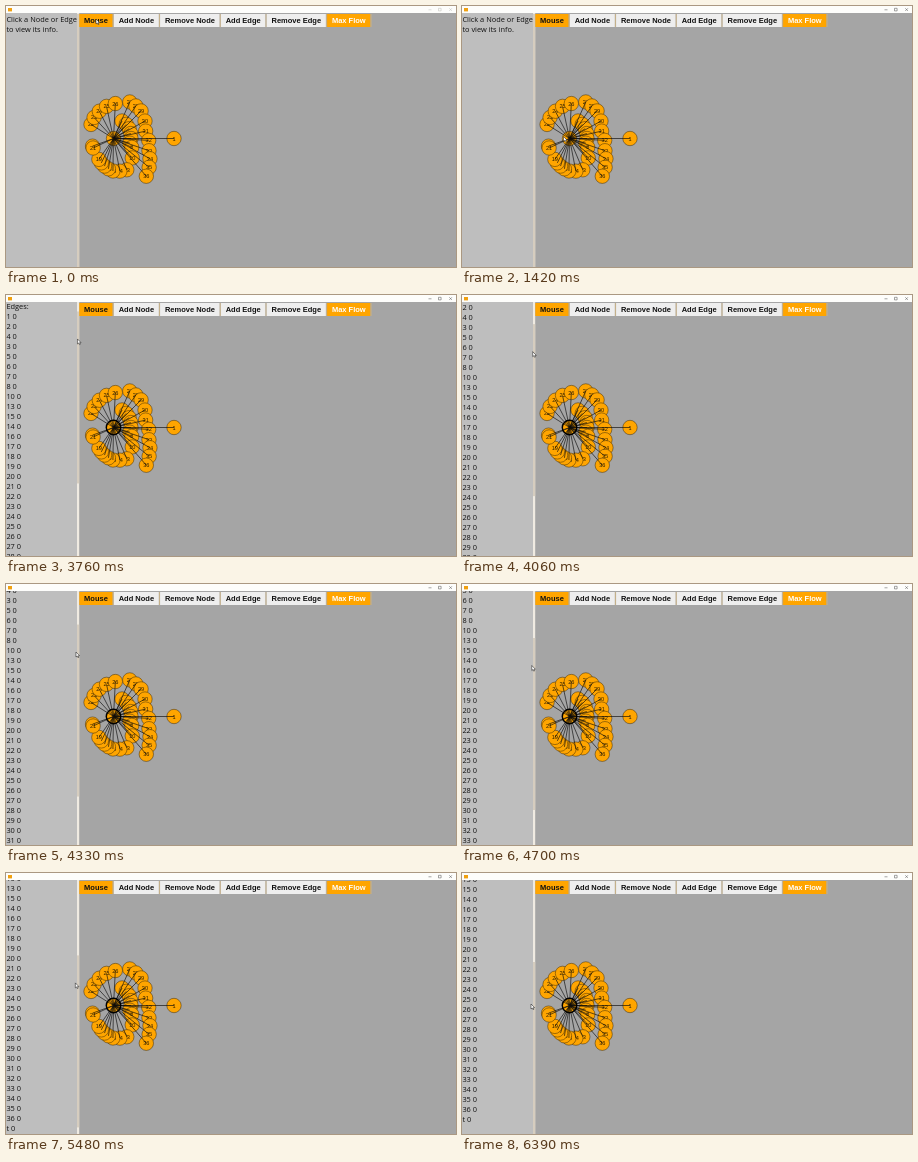
An HTML page for the animation above (6.45 s loop, 450 px wide and 261 px high).

```html
<!DOCTYPE html>
<html lang="en">
<head>
<meta charset="utf-8">
<title>Graph editor</title>
<style>
html, body { margin: 0; height: 100%; overflow: hidden; background: #a5a5a5; }
svg { display: block; width: 450px; height: 261px; }
.side { font: 7.4px "Open Sans", "Noto Sans", sans-serif; fill: #111; white-space: pre; }
.button { font: bold 7.5px "Liberation Sans", Arial, sans-serif; }
.label { font: 5.6px "Liberation Sans", Arial, sans-serif; text-anchor: middle; fill: #2a1c00; }
.node { fill: #ffa500; stroke: #3d2b08; stroke-width: .5; }
</style>
</head>
<body>
<svg viewBox="0 0 450 261">
  <defs><clipPath id="pane"><rect y="7" width="71" height="254"/></clipPath></defs>
  <rect width="450" height="261" fill="#a5a5a5"/>
  <rect y="7" width="71" height="254" fill="#bebebe"/>
  <rect x="71" y="7" width="2.2" height="254" fill="#f0ebe2"/>
  <rect id="thumb" x="71" width="2.2" fill="#d6cdbf"/>
  <g clip-path="url(#pane)">
    <g id="hint" class="side"></g>
    <g id="info" class="side"></g>
  </g>
  <g id="buttons"></g>
  <g id="graph"></g>
  <rect width="450" height="7" fill="#fdfdfb"/>
  <rect x="2" y="2" width="4" height="3.4" fill="#f0a010"/>
  <path id="controls" fill="none" stroke-width=".6"
    d="M422.5 3.8h3M432.5 2.3h2.6v2.6h-2.6zM443.3 2.3l2.6 2.6M445.9 2.3l-2.6 2.6"/>
  <path id="pointer" d="M0 0V5L1.2 4L2 5.7L2.8 5.3L2.1 3.7H3.6Z"
    fill="#fff" stroke="#111" stroke-width=".5"/>
</svg>
<script>
const LOOP = 6450, FOCUS = 300, CLICK = 2300, DRAG = 3420;
const TOP = 8, VIEW = 253, THUMB = 172, DRAG_Y = 35.5;
const $ = id => document.getElementById(id);

function add(parent, tag, attrs, text = "") {
  const el = document.createElementNS("http://www.w3.org/2000/svg", tag);
  for (const key in attrs) el.setAttribute(key, attrs[key]);
  el.textContent = text;
  return parent.appendChild(el);
}

// Values between keys of the form [position, ...values]
function between(keys, at, ease = k => k) {
  const found = keys.findIndex(key => key[0] >= at);
  const i = Math.max(1, found);
  const a = keys[i - 1], b = keys[i];
  const k = ease((at - a[0]) / (b[0] - a[0]));
  return a.slice(1).map((v, j) => v + (b[j + 1] - v) * k);
}

const range = (from, to) => Array.from({ length: to - from + 1 }, (_, i) => from + i);

// Sidebar
const writeLines = (id, lines) =>
  lines.forEach((line, i) => add($(id), "text", { x: .4, y: 15.8 + 10 * i }, line));
const order = [1, 2, 4, 3, 5, 6, 7, 8, 10, 13, 15, 14, ...range(16, 36), "t"];
writeLines("hint", ["Click a Node or Edge", "to view its info."]);
writeLines("info", ["Node s", "Edges:", ...order.map(n => n + " 0")]);

// Toolbar: each button is as wide as its text plus padding
const PAD = 4.8, GAP = 1.2;
let left = 73.3;
for (const name of ["Mouse", "Add Node", "Remove Node", "Add Edge", "Remove Edge", "Max Flow"]) {
  const bright = name[0] === "M";
  const back = add($("buttons"), "rect", { x: left, y: TOP, height: 13, fill: bright ? "#ffa500" : "#eee" });
  const text = add($("buttons"), "text", {
    x: left + PAD, y: 17.2, class: "button", fill: name === "Max Flow" ? "#fff" : "#111"
  }, name);
  const width = text.getComputedTextLength() + 2 * PAD;
  back.setAttribute("width", width);
  add($("buttons"), "rect", { x: left + width, y: TOP, width: GAP, height: 13, fill: "#c4b08a" });
  left += width + GAP;
}

// Graph: the nodes wind around the hub; keys are label, angle, radius
const hub = { x: 107.5, y: 132.5 };
const spiral = [
  [2, -64, 19.5], [7, 16, 17], [10, 46, 27], [13, 67, 34], [15, 91, 32.5],
  [19, 125, 25.5], [20, 160, 22.3], [21, 155, 22.5], [22, 212, 26.5], [26, 273, 35],
  [27, 294, 40], [29, 315, 39], [31, 347, 33], [33, 379, 37.5], [36, 409, 50]
];
function place(n) {
  const [angle, r] = n === 1 ? [0, 60.5] : between(spiral, n);
  const a = angle * Math.PI / 180;
  return { n, x: hub.x + r * Math.cos(a), y: hub.y + r * Math.sin(a) };
}
const nodes = order.filter(n => n !== "t").sort((a, b) => a - b).map(place);
const graph = $("graph");
const circle = ({ x, y }, attrs) => add(graph, "circle", { cx: x, cy: y, r: 7.2, ...attrs });
const label = ({ x, y }, name) => add(graph, "text", { x, y: y + 2, class: "label" }, name);
for (const node of nodes) {
  circle(node, { class: "node" });
  label(node, node.n);
}
circle(hub, { class: "node" });
add(graph, "path", {
  d: nodes.map(({ x, y }) => `M${hub.x} ${hub.y}L${x} ${y}`).join(""),
  stroke: "#0b0b0b", "stroke-width": .65
});
label(hub, "s");
const ring = circle(hub, { style: "fill:none;stroke:#000;stroke-width:1.4" });

// Pointer tip: time, x, y
const path = [
  [0, 90, 13], [250, 90, 13], [1300, 101.5, 130.5], [2740, 102, 130], [3400, 72, DRAG_Y],
  [3560, 72, DRAG_Y], [4330, 70, 68], [6060, 69, 131], [LOOP, 69, 131]
];
const smooth = k => k * k * (3 - 2 * k);

function draw(now) {
  const t = now % LOOP, selected = t >= CLICK;
  const [x, y] = between(path, t, t < DRAG ? smooth : undefined);
  const travel = t < DRAG ? 0 : Math.min(VIEW - THUMB, y - DRAG_Y);
  $("pointer").setAttribute("transform", `translate(${x} ${y})`);
  $("hint").style.display = selected ? "none" : "";
  $("info").style.display = ring.style.display = selected ? "" : "none";
  $("info").setAttribute("transform", `translate(0 ${-travel * 1.444})`);
  $("thumb").setAttribute("y", TOP + travel);
  $("thumb").setAttribute("height", selected ? THUMB : VIEW);
  $("controls").setAttribute("stroke", t < FOCUS ? "#c4c4c0" : "#666");
}
const start = performance.now();
(function tick() {
  draw(performance.now() - start);
  requestAnimationFrame(tick);
})();
</script>
</body>
</html>
```
